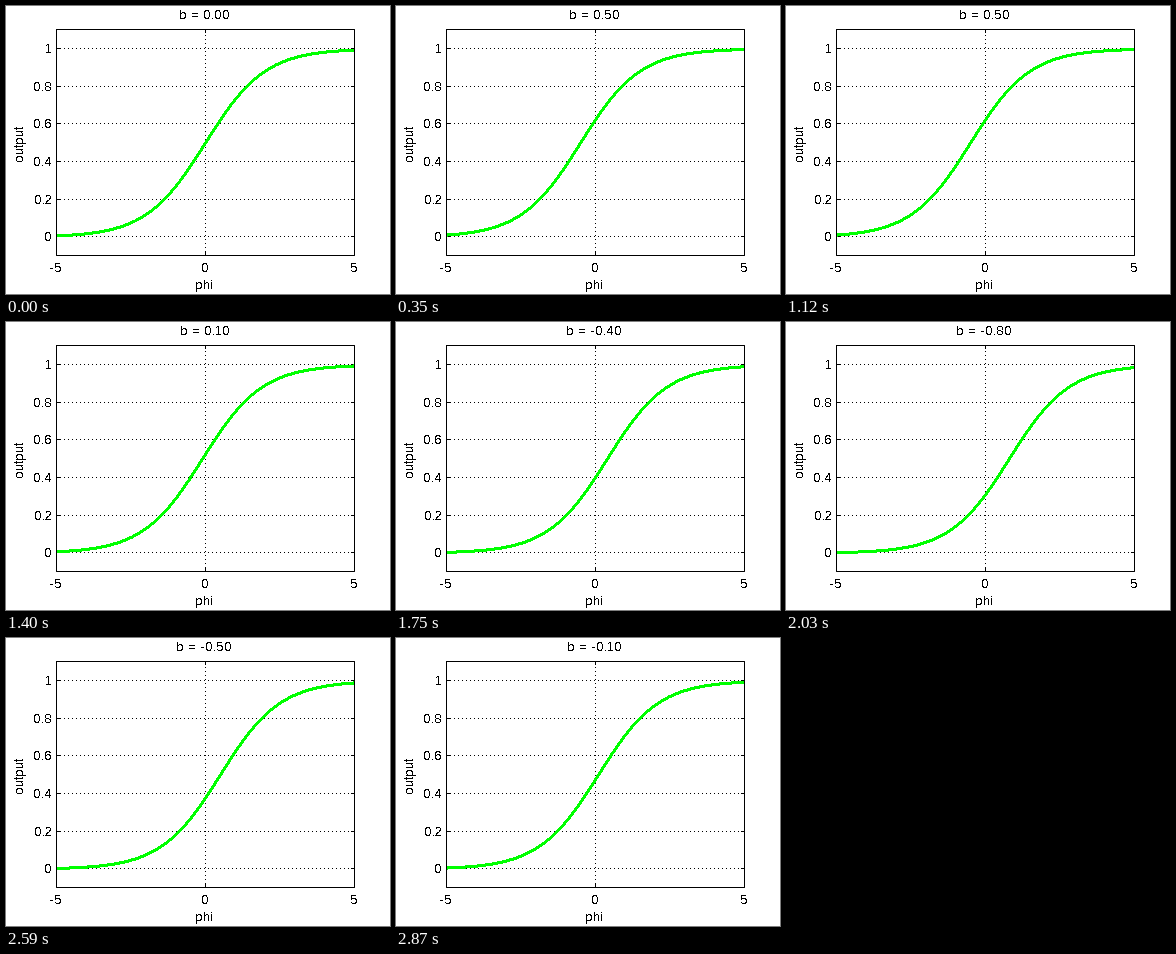
Animation of 384 by 288 pixels, one loop 2.94 s. Source, as a matplotlib script:

```python
import numpy as np
import matplotlib.pyplot as plt
from matplotlib.animation import FuncAnimation
from matplotlib.patches import Polygon

W, H, DPI = 384, 288, 96
PX = 72 / DPI                      # one pixel in points
LEFT, RIGHT, TOP, BOTTOM = 50.5, 348.5, 23.5, 249.5
FRAMES, STEP_MS = 42, 70

plt.rcParams.update({
    "font.family": "Liberation Sans",
    "font.size": 13 * PX,
    "text.antialiased": False,
    "text.hinting": "force_autohint",
    "text.hinting_factor": 1,
    "path.simplify": False,
})

fig = plt.figure(figsize=(W / DPI, H / DPI), dpi=DPI, facecolor="white")
ax = fig.add_axes([0, 0, 1, 1])
ax.set(xlim=(0, W), ylim=(H, 0))
ax.axis("off")


def to_x(phi):
    return LEFT + (phi + 5) / 10 * (RIGHT - LEFT)


def to_y(out):
    return BOTTOM - (out + 0.1) / 1.2 * (BOTTOM - TOP)


def center(v):
    return np.floor(v) + 0.5


def line(xs, ys, **kw):
    style = dict(color="black", lw=PX, snap=False,
                 solid_capstyle="butt", dash_capstyle="butt")
    return ax.plot(xs, ys, **{**style, **kw})[0]


def label(x, y, s, ha="center", **kw):
    return ax.text(x, y, s, ha=ha, va="baseline", **kw)


DOTS = (0, (1, 3))
TICK = 3.5

for v in (0, 0.2, 0.4, 0.6, 0.8, 1):
    y = center(to_y(v))
    line([LEFT - 0.5, RIGHT], [y, y], ls=DOTS)
    line([LEFT, LEFT + TICK], [y, y])
    line([RIGHT - TICK, RIGHT], [y, y])
    label(46, y + 4.5, f"{v:g}", ha="right")

for v in (-5, 0, 5):
    x = center(to_x(v))
    if v == 0:
        line([x, x], [BOTTOM + 0.5, TOP], ls=DOTS)
    line([x, x], [BOTTOM, BOTTOM - TICK])
    line([x, x], [TOP, TOP + TICK])
    label(x - 0.5, 266, str(v))

line([LEFT, RIGHT, RIGHT, LEFT, LEFT], [TOP, TOP, BOTTOM, BOTTOM, TOP],
     solid_joinstyle="miter", solid_capstyle="projecting", zorder=4)
label(198, 283, "phi")
label(17, 137, "output", rotation=90, rotation_mode="anchor")
title = label(198.5, 13, "")

phi = np.linspace(-5, 5, 201)
xs = to_x(phi)
curve = ax.add_patch(Polygon(np.zeros((3, 2)), facecolor="#00ff00", lw=0,
                             antialiased=False, snap=False, zorder=3))


def bias(k):
    """Triangle wave that holds one extra step at each peak."""
    if k <= 10:
        return k / 10
    if k <= 31:
        return (21 - k) / 10
    return (k - 42) / 10


def band(ys):
    """Stroke two pixels thick, measured across the flatter axis."""
    half = np.maximum(1, np.abs(np.gradient(ys, xs)))
    mid = ys + 0.5
    return np.column_stack([np.r_[xs, xs[::-1]],
                            np.r_[mid - half, (mid + half)[::-1]]])


def draw(k):
    b = bias(k)
    curve.set_xy(band(to_y(1 / (1 + np.exp(-(phi + b))))))
    title.set_text(f"b = {b:.2f}")
    return curve, title


anim = FuncAnimation(fig, draw, frames=FRAMES, interval=STEP_MS, repeat=True,
                     repeat_delay=0, blit=False)
plt.show()
```
